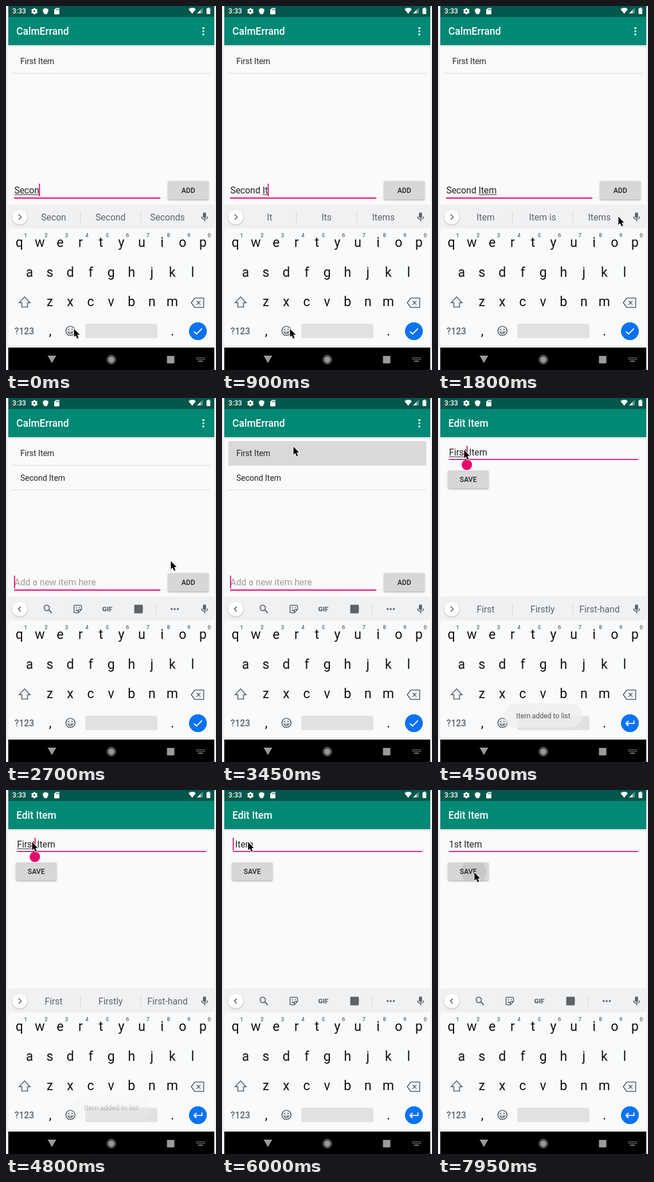
Recreate the animation shown at these times as an HTML page with a canvas. Size 366 by 633 pixels, loop 8000 ms.

```html
<!DOCTYPE html>
<html lang="en">
<head>
<meta charset="utf-8">
<title>Todo list demo</title>
<style>
  html, body { margin: 0; width: 100%; height: 100%; overflow: hidden; background: #eee; }
  canvas { display: block; width: 366px; height: 633px; }
</style>
</head>
<body>
<canvas id="stage"></canvas>
<script>
const W = 366, H = 633, LOOP = 8000, STEP = 150;
const PINK = '#e6086a', TEAL = '#008975', DARK = '#00574b', GREY = '#5f6368', INK = '#222';
const canvas = document.getElementById('stage');
const ctx = canvas.getContext('2d');
const dpr = window.devicePixelRatio || 1;
canvas.width = W * dpr;
canvas.height = H * dpr;

// Each entry: start time, then the state from that moment on
const homeText = [[0, 'Secon'], [150, 'Second'], [300, 'Second '], [600, 'Second I'],
  [900, 'Second It'], [1200, 'Second Ite'], [1350, 'Second Item'], [2400, '']];
const homeHints = [[0, 'Secon,Second,Seconds'], [150, 'Second,Seconds,Secondary'],
  [300, 'time,one,half'], [600, 'I,It,Instead'], [900, 'It,Its,Items'],
  [1200, 'Item,Items,Iterate'], [1350, 'Item,Item is,Items'], [2400, '']];
const editHead = [[0, 'First'], [4500, 'First'], [5250, 'Firs'], [5400, 'Fir'], [5550, 'Fi'],
  [5700, 'F'], [5850, ''], [6600, '1'], [6900, '1s'], [7050, '1st']];
const editHints = [[0, 'First,Firstly,First-hand'], [5400, 'Firs,First,Fire'],
  [5550, 'Fir,For,Fire'], [5700, 'Fi,Go,Fit'], [5850, 'F,For,From'], [6000, '']];
const mousePath = [[0, 118, 561], [1350, 118, 561], [1800, 314, 366], [2100, 317, 320],
  [2550, 317, 320], [3150, 124, 84], [3900, 124, 84], [4200, 45, 90],
  [7200, 45, 90], [7650, 63, 143], [8000, 63, 143]];

const at = (list, t) => list.filter(e => e[0] <= t).pop();
const clamp = v => Math.max(0, Math.min(1, v));
const caretOn = (t, since) => (t - since) % 1000 < 450;

function font(size, weight = 400) {
  ctx.font = `${weight} ${size}px Roboto, sans-serif`;
}

function text(str, x, y, size, color = INK, weight = 400, align = 'left') {
  font(size, weight);
  ctx.fillStyle = color;
  ctx.textAlign = align;
  ctx.fillText(str, x, y);
}

function width(str, size) {
  font(size);
  return ctx.measureText(str).width;
}

function box(x, y, w, h, color, r = 0) {
  ctx.fillStyle = color;
  ctx.beginPath();
  ctx.roundRect(x, y, w, h, r);
  ctx.fill();
}

function dot(x, y, r, color) {
  ctx.fillStyle = color;
  ctx.beginPath();
  ctx.arc(x, y, r, 0, Math.PI * 2);
  ctx.fill();
}

function ring(x, y, r, color, lw) {
  ctx.strokeStyle = color;
  ctx.lineWidth = lw;
  ctx.beginPath();
  ctx.arc(x, y, r, 0, Math.PI * 2);
  ctx.stroke();
}

function fillPath(d, x, y, color) {
  ctx.save();
  ctx.translate(x, y);
  ctx.fillStyle = color;
  ctx.fill(new Path2D(d));
  ctx.restore();
}

function linePath(d, x, y, color, lw) {
  ctx.save();
  ctx.translate(x, y);
  ctx.strokeStyle = color;
  ctx.lineWidth = lw;
  ctx.stroke(new Path2D(d));
  ctx.restore();
}

function shadow(blur, dy, alpha, draw) {
  ctx.save();
  ctx.shadowColor = `rgba(0,0,0,${alpha})`;
  ctx.shadowBlur = blur * dpr;
  ctx.shadowOffsetY = dy * dpr;
  draw();
  ctx.restore();
}

function button(label, x, y, w, h, ripple) {
  shadow(2.5, 1, 0.35, () => box(x, y, w, h, '#d6d7d7', 2));
  if (ripple) {
    ctx.save();
    ctx.beginPath();
    ctx.roundRect(x, y, w, h, 2);
    ctx.clip();
    dot(ripple.x, ripple.y, ripple.r, `rgba(0,0,0,${ripple.a})`);
    ctx.restore();
  }
  text(label, x + w / 2, y + h / 2 + 4.5, 12.2, INK, 500, 'center');
}

function statusBar() {
  box(4, 0, 359, 19, DARK);
  text('3:33', 11, 13, 12.2, '#fff', 500);
  ctx.save();
  ctx.translate(49.5, 9);
  for (let i = 0; i < 6; i++) {
    ctx.rotate(Math.PI / 3);
    box(-1.6, -5.6, 3.2, 4, '#fff', 0.5);
  }
  ctx.restore();
  ring(49.5, 9, 3, '#fff', 2.6);
  fillPath('M0-5.5L4.6-3.6V0Q4.2 4 0 5.7Q-4.2 4-4.6 0V-3.6Z', 69, 9, '#fff');
  fillPath('M-1.5-5.5H4.5V5.5H-4.5V-2.5Z', 88.5, 9, '#fff');
  for (let i = 0; i < 3; i++) box(87 + i * 2, 5, 1, 2.4, DARK);
  fillPath('M0 5.5L-6.4-2.6Q0-7.4 6.4-2.6Z', 324.5, 8, '#fff');
  fillPath('M5 5V-5L-5 5Z', 338, 8, 'rgba(255,255,255,.35)');
  fillPath('M1 5V-1L-5 5Z', 338, 8, '#fff');
  box(349.5, 4, 6.5, 10, '#fff', 1);
  box(351.3, 2.8, 3, 2, '#fff');
}

function appBar(title, menu) {
  box(4, 0, 359, 68, TEAL);
  const g = ctx.createLinearGradient(0, 68, 0, 72);
  g.addColorStop(0, 'rgba(0,0,0,.13)');
  g.addColorStop(1, 'rgba(0,0,0,0)');
  box(4, 68, 359, 4, g);
  text(title, 18, 50, 17.5, '#fff', 500);
  if (menu) [38.5, 44, 49.5].forEach(y => dot(344, y, 1.8, '#fff'));
}

function navBar(keyboardUp) {
  box(4, 594, 359, 39, '#000');
  const c = '#9a9a9a';
  if (keyboardUp) {
    fillPath('M-7.5-6H7.5L0 7Z', 80, 614, c);
    for (let r = 0; r < 2; r++)
      for (let i = 0; i < 6; i++) box(332 + i * 2.6, 611 + r * 3, 1.5, 1.5, c);
    box(335, 617, 8, 1.5, c);
  } else {
    fillPath('M6-7V7L-6 0Z', 79, 615, c);
  }
  dot(183.5, 615, 5.5, c);
  ring(183.5, 615, 7.2, c, 1.2);
  box(280.5, 608.5, 13, 13, c, 1);
}

function toolbarIcons() {
  ring(71, 365, 4.6, GREY, 1.8);
  linePath('M0 0L5.5 5.5', 74.3, 368.3, GREY, 2);
  linePath('M-5-6.5H5Q6.5-6.5 6.5-5V1L1 6.5H-5Q-6.5 6.5-6.5 5V-5Q-6.5-6.5-5-6.5M6 1H2.5Q1 1 1 2.5V6M-3 0Q-2 3 0 3', 125, 367, GREY, 1.6);
  dot(122.5, 364.5, 1, GREY);
  dot(127.5, 364.5, 1, GREY);
  text('GIF', 176.5, 371, 11.8, GREY, 900, 'center');
  box(223.5, 359.5, 15, 15, GREY, 1.5);
  box(261.5, 357, 1, 20, '#d3d5d8');
  [288.5, 294, 299.5].forEach(x => dot(x, 367, 1.8, GREY));
}

function keyboard(words, enter, dy) {
  ctx.save();
  ctx.beginPath();
  ctx.rect(4, 0, 359, 594);
  ctx.clip();
  ctx.translate(0, dy);
  shadow(2, -0.5, 0.15, () => box(4, 347, 359, 247, '#f8fafb'));
  box(4, 347, 359, 40, '#f0f1f3');

  shadow(3, 1, 0.25, () => dot(24, 367, 13, '#fff'));
  linePath(words ? 'M-2-4.5L2.5 0L-2 4.5' : 'M2-4.5L-2.5 0L2 4.5', 24, 367, GREY, 1.7);
  if (words) {
    words.split(',').forEach((w, i) => text(w, 83 + i * 99.2, 373, 15.72, GREY, 400, 'center'));
    box(129.5, 357, 1, 20, '#cfd1d4');
    box(234.5, 357, 1, 20, '#cfd1d4');
  } else {
    toolbarIcons();
  }
  box(343.2, 359, 5.4, 10, GREY, 2.7);
  linePath('M-5.2-1Q-5 4 0 4Q5 4 5.2-1M0 4V7.5', 346, 367, GREY, 1.5);

  [['qwertyuiop', 23.3, 419], ['asdfghjkl', 41, 470.5], ['zxcvbnm', 76.5, 522]].forEach(([keys, x, y]) =>
    [...keys].forEach((k, i) => text(k, x + i * 35.55, y, 23, '#111', 400, 'center')));
  [...'1234567890'].forEach((d, i) =>
    text(d, 34.3 + i * 35.55, 402, 9.6, GREY, 500, 'center'));

  linePath('M0-9L9.5 1H5V8.5H-5V1H-9.5Z', 32.5, 515, GREY, 1.7);
  linePath('M-5.5-8H10.5V8H-5.5L-11 0ZM-2-3.5L5 3.5M5-3.5L-2 3.5', 334, 516, GREY, 1.7);
  text('?123', 32, 570.5, 15.7, GREY, 500, 'center');
  text(',', 77, 573, 23, '#111', 400, 'center');
  text('.', 290, 573, 23, '#111', 400, 'center');
  ring(112.3, 565, 8, GREY, 1.7);
  dot(109.5, 562.5, 1.3, GREY);
  dot(115, 562.5, 1.3, GREY);
  linePath('M-4.3 2Q0 8 4.3 2Z', 112.3, 565, GREY, 1.3);
  box(138.5, 552.5, 125.5, 25, '#e0e2e2', 3);
  dot(334.5, 565.5, 15.5, '#0b72f3');
  linePath(enter ? 'M7-5V0.5H-7M-2.5-4L-7 0.5L-2.5 5' : 'M-7 0.5L-2.5 5L7-4.5', 334.5, 565.5, '#fff', 1.8);
  ctx.restore();
}

function caret(x, y) {
  box(x - 0.9, y, 1.8, 22, PINK);
}

function homeScreen(t) {
  box(4, 19, 359, 575, '#fafafa');
  appBar('CalmErrand', true);
  if (t >= 3300) box(11, 75, 345, 42, '#d9d9d9');
  const items = t >= 2400 ? ['First Item', 'Second Item'] : ['First Item'];
  items.forEach((s, i) => {
    text(s, 25, 101 + i * 43, 13.98);
    box(11, 116.5 + i * 43, 345, 1, '#dcdcdc');
  });

  const [since, value] = at(homeText, t);
  const x = 14.4, size = 15.72;
  if (value) {
    text(value, x, 326, size);
    const start = value.lastIndexOf(' ') + 1;
    const from = x + width(value.slice(0, start), size);
    box(from, 327.5, x + width(value, size) - from, 1, INK);
  } else {
    text('Add a new item here', x, 326, size, '#9c9c9c');
  }
  box(14, 333, 255, 2, PINK);
  if (caretOn(t, since)) caret(x + width(value, size) + 0.4, 309);

  const p = (t - 2250) / 150;
  const ripple = p >= 0 && p < 3 && { x: 318, y: 320, r: 18 + p * 16, a: 0.1 - p * 0.025 };
  button('ADD', 282.5, 304.5, 70.5, 32, ripple);
  navBar(true);
}

function editScreen(t) {
  box(4, 0, 359, 594, '#fafafa');
  appBar('Edit Item', false);
  const [since, head] = at(editHead, t);
  const x = 19.2, size = 15.72, end = x + width(head, size);
  text(head + ' Item', x, 100, size);
  if (t >= 4350) box(19, 106, 330, 1.8, PINK);
  else box(19, 106.3, 330, 1, '#858585');
  const ripple = t >= 7950 && { x: 62, y: 142, r: 22, a: 0.07 };
  button('SAVE', 17.5, 126, 70.5, 31.5, ripple);
  if (t >= 4500) {
    if (head && t < 6000) box(x, 101.7, end - x, 1, INK);
    if (caretOn(t, since)) caret(end + 0.4, 83);
    if (t < 5250) fillPath('M0-10L6.5-6A9 9 0 1 1-6.5-6Z', end, 116, PINK);
  }
  navBar(t >= 4350);
}

function toast(alpha) {
  ctx.save();
  ctx.globalAlpha = alpha;
  box(115, 531, 137, 42, '#eee', 21);
  text('Item added to list', 183.5, 556.5, 12.2, INK, 400, 'center');
  ctx.restore();
}

function pointer(t) {
  const i = mousePath.findIndex(p => p[0] > t);
  const [t0, x0, y0] = mousePath[i - 1], [t1, x1, y1] = mousePath[i];
  const k = (t - t0) / (t1 - t0), e = k * k * (3 - 2 * k);
  const x = x0 + (x1 - x0) * e, y = y0 + (y1 - y0) * e;
  const d = 'M0.5 0.5V14.5L3.6 11.7L6 17.3L8.5 16.2L6.1 10.8H10.4Z';
  ctx.lineJoin = 'round';
  linePath(d, x, y, '#fff', 2);
  ctx.lineJoin = 'miter';
  fillPath(d, x, y, '#000');
}

function draw(t) {
  ctx.setTransform(dpr, 0, 0, dpr, 0, 0);
  box(0, 0, W, H, '#eee');
  if (t < 3900) {
    homeScreen(t);
    if (t < 3750) keyboard(at(homeHints, t)[1], false, 0);
  }
  if (t >= 3600) {
    const opening = t < 3750 ? 0.96 : t < 3900 ? 0.995 : 1;
    ctx.save();
    ctx.globalAlpha = t < 3750 ? 0.75 : 1;
    ctx.translate(183.5, 316.5);
    ctx.scale(opening, opening);
    ctx.translate(-183.5, -316.5);
    editScreen(t);
    ctx.restore();
    if (t >= 4350) keyboard(at(editHints, t)[1], true, t < 4500 ? 110 : 0);
    const fade = clamp((4950 - t) / 600);
    if (fade > 0) toast(fade);
  }
  statusBar();
  pointer(t);
}

function tick() {
  const t = performance.now() % LOOP;
  draw(Math.floor(t / STEP) * STEP);
  requestAnimationFrame(tick);
}
tick();
</script>
</body>
</html>
```
